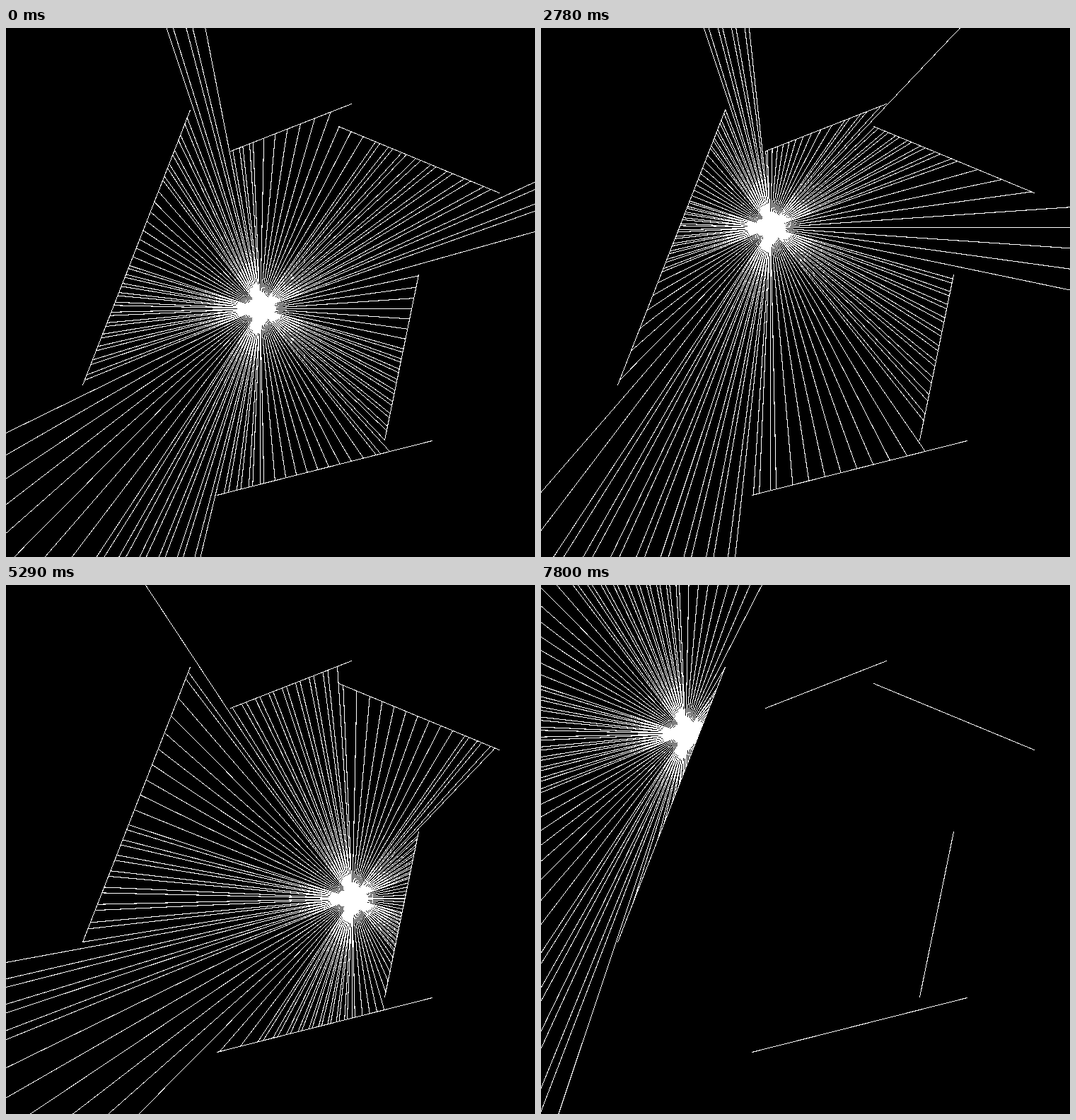
Recreate the animation shown at these times as an HTML page with a canvas. Size 748 by 749 pixels, loop 8 s.

```html
<!DOCTYPE html>
<html lang="en">
<head>
<meta charset="utf-8">
<title>Ray casting</title>
<style>
  html, body { margin: 0; width: 100%; height: 100%; overflow: hidden; background: #000; }
  canvas { display: block; width: 748px; height: 749px; }
</style>
</head>
<body>
<canvas id="stage" width="748" height="749"></canvas>
<script>
const W = 748, H = 749, LOOP = 8000, STEP = 278.5, LEAD = 15, FAR = 1500;
const STRETCH = 1.033; // the scene is slightly taller than wide
const CUT = 116;       // brightness from which a pixel turns white
const BLACK = 0xff000000, WHITE = 0xffffffff;
const ctx = document.getElementById('stage').getContext('2d', { willReadFrequently: true });

// x1, y1, x2, y2
const walls = [
  [260.3, 115, 108, 505],
  [317, 174, 488, 107],
  [470, 139, 697, 233],
  [583, 349, 535, 583],
  [298, 661, 602, 584]
];

// step, x, y of the light
const path = [
  [0, 359, 397], [5, 204, 229], [10, 324.2, 282.3], [14, 475.4, 564.5],
  [19, 489.2, 443.5], [24, 302, 379], [28, 204, 210]
];

// The angles count in radians, which gives the five-fold bunching
const rays = [];
for (let a = -172.5; a <= 185; a += 2.5) rays.push([Math.cos(a), Math.sin(a) * STRETCH]);

function slope(i, axis) {
  const a = path[Math.max(i - 1, 0)], b = path[Math.min(i + 1, path.length - 1)];
  return (b[axis] - a[axis]) / (b[0] - a[0]);
}

function lightAt(step) {
  let i = 0;
  while (i < path.length - 2 && step >= path[i + 1][0]) i++;
  const a = path[i], b = path[i + 1], span = b[0] - a[0];
  const u = (step - a[0]) / span, v = 1 - u;
  return [1, 2].map(k =>
    v * v * (1 + 2 * u) * a[k] + u * u * (3 - 2 * u) * b[k] +
    span * u * v * (v * slope(i, k) - u * slope(i + 1, k)));
}

// Distance along the ray to the nearest wall
function cast(x, y, dx, dy) {
  let best = FAR;
  for (const [x1, y1, x2, y2] of walls) {
    const ex = x2 - x1, ey = y2 - y1;
    const det = dx * ey - dy * ex;
    if (!det) continue;
    const t = ((x1 - x) * ey - (y1 - y) * ex) / det;
    const s = ((x1 - x) * dy - (y1 - y) * dx) / det;
    if (t > 0 && s >= 0 && s <= 1 && t < best) best = t;
  }
  return best;
}

function line(x1, y1, x2, y2) {
  ctx.beginPath();
  ctx.moveTo(x1 + 0.5, y1 + 0.5);
  ctx.lineTo(x2 + 0.5, y2 + 0.5);
  ctx.stroke();
}

// Reduce the picture to plain black and white
function harden() {
  const image = ctx.getImageData(0, 0, W, H);
  const pixels = new Uint32Array(image.data.buffer);
  for (let i = 0; i < pixels.length; i++) {
    pixels[i] = (pixels[i] & 255) < CUT ? BLACK : WHITE;
  }
  ctx.putImageData(image, 0, 0);
}

function draw(step) {
  const [x, y] = lightAt(step);
  ctx.fillStyle = '#000';
  ctx.fillRect(0, 0, W, H);
  ctx.strokeStyle = '#fff';
  ctx.lineWidth = 1;
  for (const w of walls) line(...w);
  for (const [dx, dy] of rays) {
    const d = cast(x, y, dx, dy);
    line(x, y, x + dx * d, y + dy * d);
  }
  harden();
}

let shown = -1;
const start = performance.now();
function tick() {
  const t = (performance.now() - start) % LOOP;
  const step = Math.min(28, Math.floor((t + LEAD) / STEP));
  if (step !== shown) draw(shown = step);
  requestAnimationFrame(tick);
}
tick();
</script>
</body>
</html>
```
